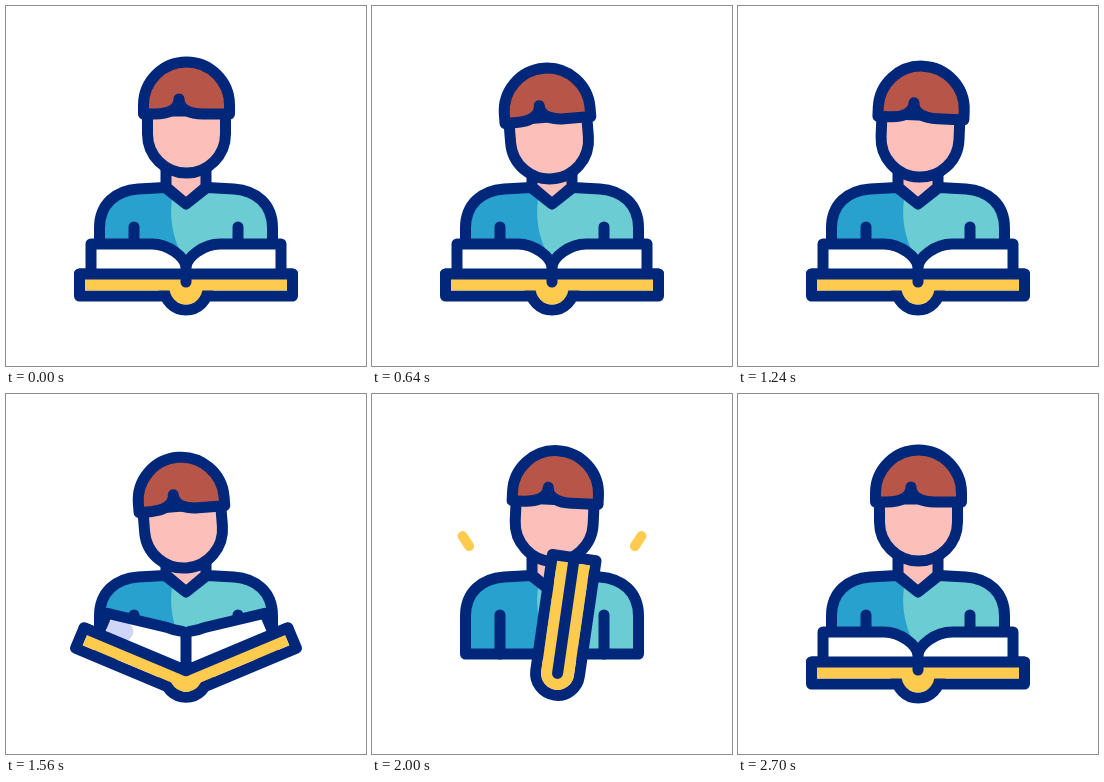
Write an HTML page that moves like this. It is 360x360 px and loops after 2.82 s.

```html
<!DOCTYPE html>
<html lang="en">
<head>
<meta charset="utf-8">
<title>Reader</title>
<style>
html, body { margin: 0; width: 100%; height: 100%; overflow: hidden; background: #fff; }
svg { display: block; width: 100%; height: 100%; }
.ink { stroke: #00277a; stroke-width: 11; stroke-linecap: round; stroke-linejoin: round; }
.line { fill: none; }
.skin { fill: #fdbfb9; }
.hair { fill: #b75548; }
.gold { fill: #ffcb4f; }
.paper { fill: #fff; }
.spark { stroke: #ffcb4f; stroke-width: 10; stroke-linecap: round; }
.shade { stroke: #cfd6f7; stroke-width: 20; stroke-linecap: round; }
</style>
</head>
<body>
<svg viewBox="0 0 360 360">
  <g id="sparks">
    <path class="spark"/>
    <path class="spark"/>
  </g>
  <path class="ink skin" d="M160 155V181L180 198L200 181V155"/>
  <g id="head">
    <path class="ink skin" d="M141.500 105V128a39 39 0 0 0 78 0V105Z"/>
    <path class="ink hair" d="M137.500 108V99a43 43 0 0 1 86 0V108H197C185 108 173 104 173 93C173 104 161 108 149 108Z"/>
  </g>
  <clipPath id="torso"><path id="shirt" d="M93.500 260V222C93.500 198 110 184.500 132 183L159 181.500L180 198L201 181.500L228 183C250 184.500 266.500 198 266.500 222V260Z"/></clipPath>
  <g clip-path="url(#torso)">
    <rect x="88" y="175" width="184" height="90" fill="#6bcdd3"/>
    <path fill="#28a1cf" d="M88 175H170C163 198 163 222 174 245L180 265H88Z"/>
  </g>
  <use href="#shirt" class="ink line"/>
  <path class="ink line" d="M128 221V260M232 221V260"/>
  <g id="book">
    <path id="edge" class="ink line"/>
    <path id="gold" class="gold"/>
    <path id="paper" class="paper"/>
    <path id="shade" class="shade"/>
    <path id="lines" class="ink line"/>
  </g>
</svg>
<script>
const LOOP = 2820;
const $ = id => document.getElementById(id);
const set = (el, name, value) => el.setAttribute(name, value);
const ease = u => (1 - Math.cos(Math.PI * u)) / 2;
const mix = (a, b, u) => a + (b - a) * u;

// Eased value between [time, value] keys
function at(keys, t) {
  if (t <= keys[0][0]) return keys[0][1];
  for (let i = 1; i < keys.length; i++) {
    const [t0, a] = keys[i - 1], [t1, b] = keys[i];
    if (t <= t1) return mix(a, b, ease((t - t0) / (t1 - t0)));
  }
  return keys[keys.length - 1][1];
}

const nod = [[60, 0], [600, 6], [1040, 1], [1440, 7], [1580, 7], [2000, .5], [2160, 0]];
const turn = [[60, 0], [600, -4.6], [680, -4.6], [1180, 2.9], [1540, -4.6], [1600, -4.6], [1960, 2.6], [2020, 2.6], [2300, 0]];
const fold = [[1400, 0], [1880, 90], [2100, 90], [2540, 0]];
const tilt = [[1840, 0], [1980, 8.2], [2010, 8.2], [2140, 0]];
const [sparkStart, sparkEnd] = [1860, 2100];

function drawBook(angle, lean) {
  const a = angle * Math.PI / 180, c = Math.cos(a), s = Math.sin(a);
  const p = angle / 90, q = Math.min(1, angle / 23);
  const hinge = mix(276, 279, p), spine = mix(282, 279, p);
  const len = 106.5 + 10.5 * s, top = -8 * (1 - q);
  const outer = top - 30 * (1 - p);
  const inner = outer - 19 * Math.sin(2 * a) * (1 - p);
  const bend = hinge - mix(14, 32, q);

  const half = side => {
    const pt = (x, y) => {
      const wx = 180 + side * (x * c - y * s), wy = hinge + x * s + y * c;
      return wx.toFixed(2) + ' ' + wy.toFixed(2) + ' ';
    };
    const poly = (...pts) => 'M' + pts.map(v => pt(...v)).join('L');
    const page = 'M' + pt(-95, top) + 'L' + pt(-95, outer) + 'L' + pt(-34, inner) +
      'C' + pt(-18, inner) + `180 ${bend - 11} 180 ${bend}V${hinge}`;
    return {
      edge: poly([0, top], [-len, top], [-len, top + 22], [0, top + 22]),
      gold: poly([0, top], [5.5 - len, top], [5.5 - len, top + 16.5], [0, top + 16.5]) + 'Z',
      paper: page + 'L' + pt(0, top) + 'Z',
      lines: page + poly([0, top], [-len, top]),
      shade: poly([-80, -12], [-73, -12])
    };
  };
  const bowl = r => `M${180 - r} ${spine}A${r} ${r} 0 0 0 ${180 + r} ${spine}`;
  const l = half(1), r = half(-1);
  set($('edge'), 'd', l.edge + r.edge + bowl(22));
  set($('gold'), 'd', l.gold + bowl(16.5) + 'Z');
  // Opposite winding is flipped so that overlapping parts stay solid
  $('gold').style.fillRule = 'nonzero';
  set($('right'), 'd', r.gold);
  set($('paper'), 'd', p < 1 ? l.paper + r.paper : '');
  set($('lines'), 'd', p < 1 ? l.lines + r.lines : `M180 ${hinge}V${hinge - len}`);
  set($('shade'), 'd', l.shade);
  const fade = angle < 23 ? (angle - 8) / 15 : (50 - angle) / 22;
  set($('shade'), 'opacity', Math.max(0, Math.min(1, fade)));
  set($('book'), 'transform', `rotate(${lean} 180 318)`);
}

function drawSparks(t) {
  const u = (t - sparkStart) / (sparkEnd - sparkStart);
  const on = u > 0 && u < 1;
  set($('sparks'), 'visibility', on ? 'visible' : 'hidden');
  if (!on) return;
  const far = mix(-16, 8, ease(u)), size = 6 * Math.min(1, 4 * u, 4 * (1 - u));
  [-1, 1].forEach((side, i) => {
    const pt = d => `${180 + side * (86.5 + .54 * d)} ${146.5 - .84 * d}`;
    const el = $('sparks').children[i];
    set(el, 'd', `M${pt(far - size)}L${pt(far + size)}`);
    set(el, 'stroke-width', 10);
    el.style.strokeWidth = 10 * Math.min(1, 6 * u, 6 * (1 - u));
  });
}

function draw(t) {
  set($('head'), 'transform', `translate(0 ${at(nod, t)}) rotate(${at(turn, t)} 180 165)`);
  drawBook(at(fold, t), at(tilt, t));
  drawSparks(t);
}

const right = $('gold').cloneNode();
right.id = 'right';
$('gold').after(right);

const start = performance.now();
function tick() {
  draw((performance.now() - start) % LOOP);
  requestAnimationFrame(tick);
}
draw(0);
tick();
</script>
</body>
</html>
```
